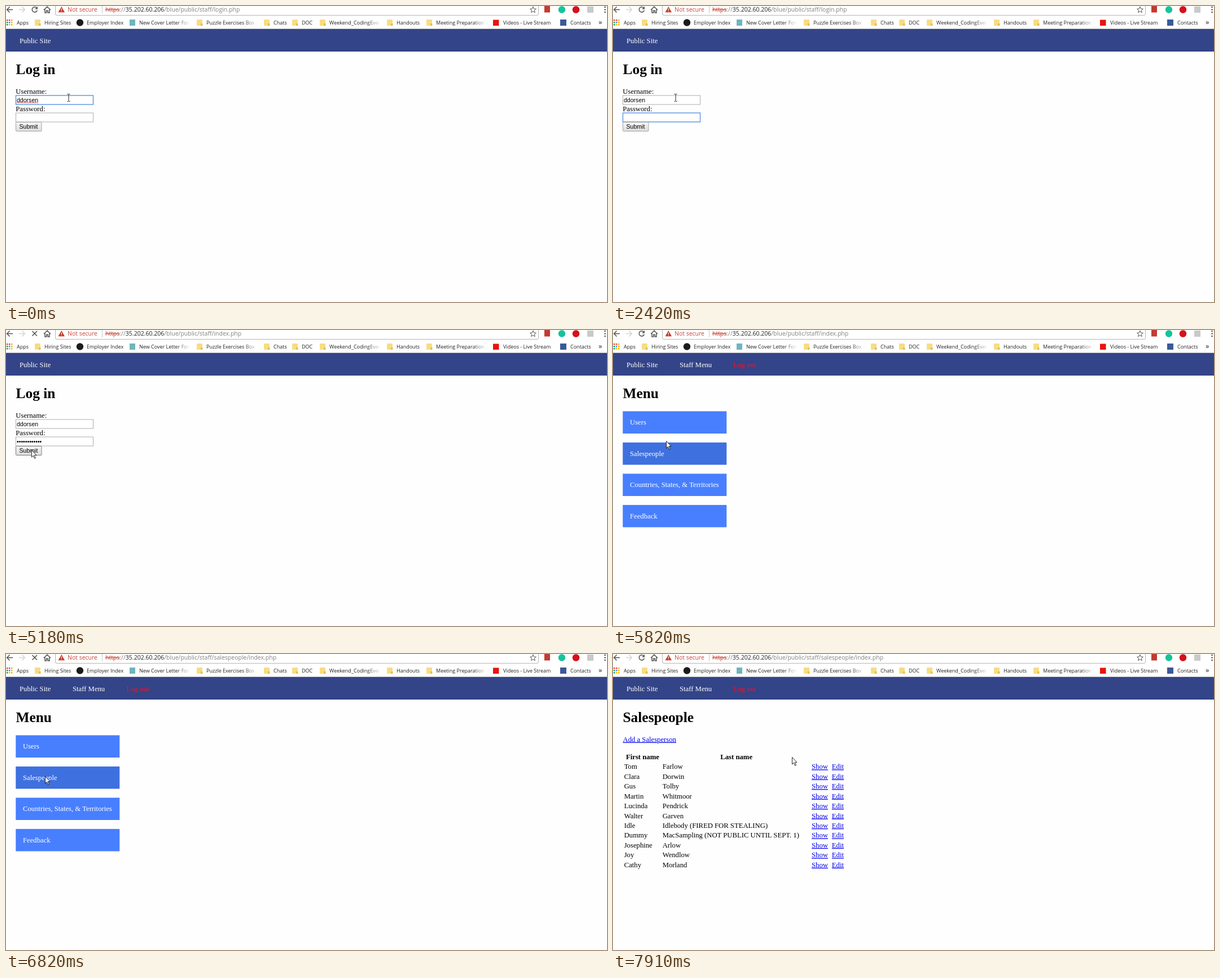
These frames come from a looping animation (1065 by 526 pixels, 8 s). An HTML page:

```html
<!DOCTYPE html>
<html lang="en">
<head>
<meta charset="utf-8">
<title>Staff login</title>
<style>
  html, body { margin: 0; width: 100%; height: 100%; overflow: hidden; background: #fefefe; }
  svg { display: block; width: 100%; height: 100%; }
  text { white-space: pre; }
  .page { font: 12.7px "Liberation Serif", "Times New Roman", serif; }
  .h1 { font-size: 25.4px; font-weight: bold; }
  .bold { font-weight: bold; }
  .link { fill: #00e; text-decoration: underline; }
  .field { font: 10.55px "Liberation Sans", Arial, sans-serif; }
  .bar { font: 9px "Open Sans", "Noto Sans", sans-serif; fill: #222; }
  .url { font: 10.5px "Open Sans", "Noto Sans", sans-serif; fill: #808080; }
  .icon { fill: none; stroke: #505050; stroke-width: 1.5; }
</style>
</head>
<body>
<svg id="stage" viewBox="0 0 1065 526" preserveAspectRatio="none"></svg>
<script>
const LOOP = 8000;

const text = (x, y, str, cls = '', attrs = '') =>
  `<text x="${x}" y="${y}" class="${cls}" ${attrs}>${str}</text>`;
const rect = (x, y, w, h, fill, attrs = '') =>
  `<rect x="${x}" y="${y}" width="${w}" height="${h}" fill="${fill}" ${attrs}/>`;
const circle = (x, y, r, fill) => `<circle cx="${x}" cy="${y}" r="${r}" fill="${fill}"/>`;
const group = (id, body, attrs = '') => `<g id="${id}" ${attrs}>${body}</g>`;
const icon = (d, attrs = '') => `<path class="icon" d="${d}" ${attrs}/>`;

// Bookmarks: text position, label, icon kind, fades out at 90px
const bookmarks = [
  [68, 'Hiring Sites', 'folder'],
  [143, 'Employer Index', 'black'],
  [236, 'New Cover Letter Form', 'teal', true],
  [355, 'Puzzle Exercises Box', 'folder', true],
  [474, 'Chats', 'folder'],
  [524, 'DOC', 'folder'],
  [573, 'Weekend_CodingEvent', 'folder', true],
  [692, 'Handouts', 'folder'],
  [762, 'Meeting Preparation N', 'folder', true],
  [881, 'Videos - Live Stream', 'red'],
  [1000, 'Contacts', 'blue'],
];
const bookmarkIcons = {
  folder: x => rect(x - 17, 24, 10, 11, '#f7dc84', 'rx="1"') + rect(x - 10, 31, 3.5, 4, '#e9bd52'),
  black: x => circle(x - 12, 29.5, 6.2, '#1b1b1b'),
  teal: x => rect(x - 17, 24, 10, 11, '#6fb5bd'),
  red: x => rect(x - 18, 24.5, 10.5, 10.5, '#e8140c'),
  blue: x => rect(x - 18, 24, 11, 11, '#3b5998'),
};

function bookmark([x, label, kind, fades]) {
  const fade = fades ? rect(x + 66, 20, 25, 19, 'url(#fade)') + rect(x + 90.5, 20, 45, 19, '#fff') : '';
  return bookmarkIcons[kind](x) + text(x, 33, label, 'bar') + fade;
}

function browserBar() {
  const dotColors = ['#db4437', '#db4437', '#f4a142', '#0f9d58', '#4285f4', '#f4b400', '#0f9d58', '#f4b400', '#f4b400'];
  const apps = dotColors.map((c, i) => rect(1 + i % 3 * 4, 24 + (i / 3 | 0) * 4, 2.5, 2.5, c)).join('');
  return rect(0, 0, 1065, 41, '#fff')
    + icon('M12 6.5H2M6.5 1.5L1.7 6.5L6.5 11.5')
    + icon('M23 6.5H33M28.5 1.5L33.3 6.5L28.5 11.5', 'style="stroke:#d4d4d4"')
    + group('reload', icon('M54.2 3.1A4.6 4.6 0 1 0 55.3 7.5') + '<path d="M56 0.8V5.6H51.2Z" fill="#505050"/>')
    + group('stop', icon('M46.5 2L55 10.5M55 2L46.5 10.5'))
    + icon('M67 7L73 1.3L79 7M69 6V12H71.7V8.3H74.3V12H77V6', 'stroke-width="1.3"')
    + '<path d="M87.5 0V14Q87.5 16.5 90 16.5H941Q943.5 16.5 943.5 14V0" fill="none" stroke="#b5b5b5"/>'
    + '<path d="M98.3 1L104 11.3H92.6Z" fill="#c53929"/>' + rect(97.7, 4.3, 1.2, 3.4, '#fff') + rect(97.7, 8.6, 1.2, 1.2, '#fff')
    + text(109, 10.3, 'Not secure', 'url', 'style="fill:#c8443a"')
    + rect(170, 0, 1, 13, '#c4c4c4')
    + text(176, 10.3, '<tspan fill="#c53929" text-decoration="line-through">https</tspan>://'
        + '<tspan fill="#222">35.202.60.206</tspan>/blue/public/staff/<tspan id="path"></tspan>', 'url')
    + '<path d="M934 1.2L935.5 4.9L939.4 5.2L936.4 7.7L937.4 11.5L934 9.4L930.6 11.5L931.6 7.7L928.6 5.2L932.5 4.9Z" fill="none" stroke="#555"/>'
    + rect(954, 0, 10, 11.5, '#c23b32')
    + circle(985, 6.5, 6.2, '#15c39a')
    + circle(1010, 6.5, 6.3, '#d5101b')
    + rect(1030, 1, 11, 11, '#c9c9c9')
    + [2, 6.5, 11].map(y => circle(1061.5, y, 1.3, '#505050')).join('')
    + apps + text(19, 33, 'Apps', 'bar')
    + bookmarks.map(bookmark).join('')
    + text(1050, 33, '»', 'bar', 'style="font-size:13px"')
    + rect(0, 40, 1065, 1, '#b9bcc6');
}

const heading = str => text(17.5, 121, str, 'h1');

function loginPage() {
  const input = (id, y) => rect(17.5, y, 137, 16, '#fff', `id="${id}"`);
  let wave = 'M19 172.5';
  for (let x = 20; x < 57; x += 2) wave += `l1 -1l1 1`;
  return heading('Log in')
    + text(17.3, 155.7, 'Username:') + input('user', 159)
    + text(19, 171, 'ddorsen', 'field')
    + `<path id="wave" d="${wave}" fill="none" stroke="#e02020" stroke-width=".8"/>`
    + text(17.3, 186.7, 'Password:') + input('pass', 190)
    + text(19, 202, '•'.repeat(12), 'field', 'id="dots"')
    + rect(17.5, 206.5, 45.5, 16, 'url(#button)', 'id="submit" rx="1"')
    + text(23.5, 218.3, 'Submit', 'field')
    + rect(0, 0, 1, 12, '#000', 'id="caret"');
}

function menuPage() {
  const items = ['Users', 'Salespeople', 'Countries, States, &amp; Territories', 'Feedback'];
  return heading('Menu') + items.map((label, i) => {
    const y = 144.4 + i * 55.5;
    return rect(17.3, y, 184, 39.6, '#487fff', `id="item${i}"`) + text(30, y + 23.8, label, '', 'fill="#fff"');
  }).join('');
}

function listPage() {
  const people = [
    'Tom|Farlow', 'Clara|Dorwin', 'Gus|Tolby', 'Martin|Whitmoor', 'Lucinda|Pendrick', 'Walter|Garven',
    'Idle|Idlebody (FIRED FOR STEALING)', 'Dummy|MacSampling (NOT PUBLIC UNTIL SEPT. 1)',
    'Josephine|Arlow', 'Joy|Wendlow', 'Cathy|Morland',
  ];
  const rows = people.map((person, i) => {
    const [first, last] = person.split('|'), y = 204.2 + i * 17.46;
    return text(19.7, y, first) + text(87.7, y, last) + text(352, y, 'Show', 'link') + text(387.8, y, 'Edit', 'link');
  });
  return heading('Salespeople') + text(17.5, 155.7, 'Add a Salesperson', 'link')
    + text(23, 186.7, 'First name', 'bold') + text(190.3, 186.7, 'Last name', 'bold') + rows.join('');
}

document.getElementById('stage').innerHTML = `
  <defs>
    <linearGradient id="fade"><stop stop-color="#fff" stop-opacity="0"/><stop offset="1" stop-color="#fff"/></linearGradient>
    <linearGradient id="button" x2="0" y2="1"><stop stop-color="#f6f6f6"/><stop offset="1" stop-color="#dcdcdc"/></linearGradient>
  </defs>`
  + rect(0, 0, 1065, 526, '#fefefe') + browserBar()
  + group('content',
      rect(0, 41, 1065, 40, '#348') + text(24, 66, 'Public Site', '', 'fill="#fff"')
      + group('staff', text(118, 66, 'Staff Menu', '', 'fill="#fff"') + text(213.5, 66, 'Log out', '', 'fill="#f0142d"'))
      + group('login', loginPage()) + group('menu', menuPage()) + group('list', listPage()), 'class="page"')
  + '<path id="beam" d="M-2.5 -6.5H-.8L0 -5.7L.8 -6.5H2.5M0 -5.7V5.7M-2.5 6.5H-.8L0 5.7L.8 6.5H2.5" fill="none" stroke="#222"/>'
  + '<path id="arrow" d="M.5 .5V13L3.4 10.3L5.5 15.3L7.4 14.5L5.3 9.6H9Z" fill="#fff" stroke="#111" stroke-width=".9"/>';

// Each track is a list of [time, value] with hard changes
const tracks = {
  page: [[0, 'login'], [5300, 'menu'], [7080, 'list']],
  path: [[0, 'login.php'], [4770, 'index.php'], [6820, 'salespeople/index.php']],
  loading: [[0, false], [4050, true], [5300, false], [6420, true], [7080, false]],
  focus: [[0, 'user'], [1850, 'pass'], [3930, '']],
  typed: [[0, false], [2570, true]],
  caret: [[0, null], [120, [57, 161]], [550, null], [1120, [57, 161]], [1710, null], [1850, [19, 192]], [2420, null],
    [2570, [63, 192]], [3000, null], [3520, [63, 192]], [3930, null]],
  button: [[0, ''], [3120, 'hover'], [3250, ''], [3660, 'hover'], [3790, 'down'], [3930, 'hover']],
  hovered: [[0, false], [5430, true], [5970, false], [6120, true]],
  pointer: [[0, [111, 163]], [3000, [88, 188]], [3120, [58, 220]], [3250, [38, 245]], [3370, [33, 235]], [3520, [35, 226]],
    [3660, [38, 217]], [3930, [42, 214]], [4050, [45, 213]], [5300, [54, 213]], [5430, [64, 213]], [5550, [74, 213]],
    [5690, [84, 205]], [5820, [94, 197]], [5970, [92, 191]], [6120, [74, 209]], [6280, [66, 217]], [6420, [70, 221]],
    [6540, [69, 217]], [7080, [63, 221]], [7370, [108, 203]], [7510, [205, 192]], [7640, [311, 181]], [7910, [317, 183]]],
  beam: [[0, true], [3120, false]],
};

const $ = id => document.getElementById(id);
const show = (id, on) => $(id).setAttribute('display', on ? 'inline' : 'none');
const move = (id, [x, y]) => $(id).setAttribute('transform', `translate(${x} ${y})`);
const at = (track, t) => track.findLast(([start]) => start <= t)[1];

function draw(t) {
  const s = {};
  for (const name in tracks) s[name] = at(tracks[name], t);

  for (const page of ['login', 'menu', 'list']) show(page, s.page === page);
  show('staff', s.page !== 'login');
  $('path').textContent = s.path;
  show('reload', !s.loading);
  show('stop', s.loading);

  for (const id of ['user', 'pass']) {
    $(id).setAttribute('stroke', s.focus === id ? '#5b93e6' : '#adadad');
    $(id).setAttribute('stroke-width', s.focus === id ? 1.4 : 1);
  }
  show('wave', s.focus === 'user');
  show('dots', s.typed);
  show('caret', s.caret);
  if (s.caret) move('caret', s.caret);
  $('submit').setAttribute('stroke', s.button ? '#7c7c7c' : '#a6a6a6');
  $('submit').setAttribute('fill', s.button === 'down' ? '#dcdcdc' : 'url(#button)');
  $('item1').setAttribute('fill', s.hovered ? '#3e70e0' : '#487fff');

  const pointer = s.beam ? 'beam' : 'arrow';
  show('beam', s.beam);
  show('arrow', !s.beam);
  move(pointer, s.pointer);
}

const start = performance.now();
function tick() {
  draw((performance.now() - start) % LOOP);
  requestAnimationFrame(tick);
}
tick();
</script>
</body>
</html>
```
